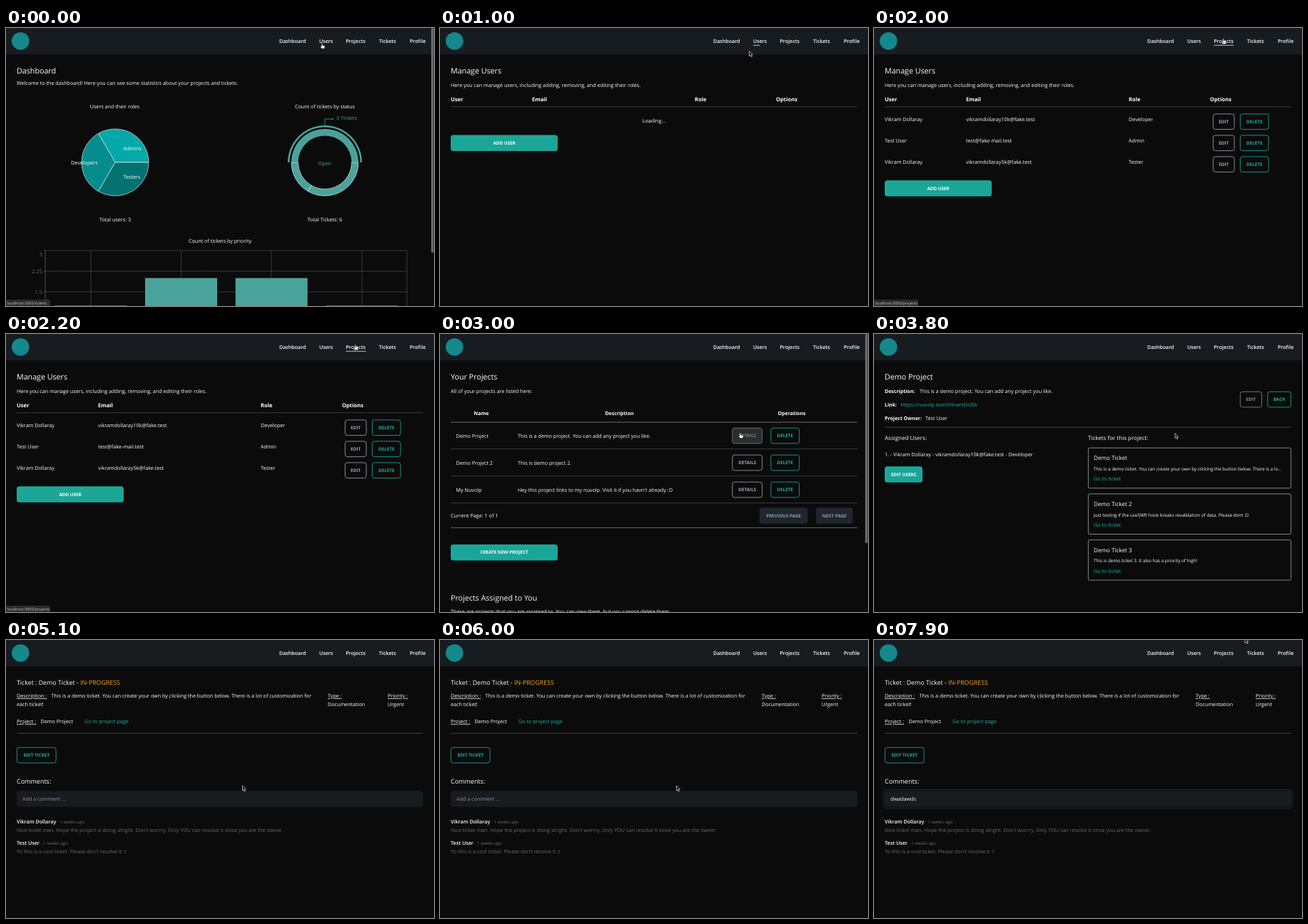
Recreate the animation shown at these times as an HTML page. Size 600 by 391 pixels, loop 8000 ms.

```html
<!DOCTYPE html>
<html lang="en">
<head>
<meta charset="utf-8">
<title>Ticket tracker tour</title>
<style>
  html, body { margin: 0; height: 100%; overflow: hidden; background: #0b0b0b; }
  svg { display: block; width: 600px; height: 391px; font: 500 7.2px "Open Sans", "Noto Sans", sans-serif; fill: #fff; text-rendering: geometricPrecision; }
  text { white-space: pre; }
  .b { font-weight: 700; }
  .m { font-weight: 600; }
  .c { text-anchor: middle; }
  .e { text-anchor: end; }
  .u { text-decoration: underline; }
  .teal { fill: #1fb2a6; }
  .grey { fill: #6c6c6c; }
  .dim { fill: #8b929a; }
</style>
</head>
<body>
<svg id="stage" viewBox="0 0 600 391"></svg>
<script>
const LOOP = 8000, TEAL = '#1fb2a6', CHART = '#4aa39a', MUTED = '#a3a9b3';
const PERSON = 'Vikram Dollaray', GUEST = 'Test User';

// Drawing helpers, each returning SVG markup
const text = (x, y, str, cls = '', size = 7.2) =>
  `<text x="${x}" y="${y}" class="${cls}" style="font-size:${size}px">${str}</text>`;
const span = (str, cls, size = 7.2) => `<tspan class="${cls}" style="font-size:${size}px">${str}</tspan>`;
const rect = (x, y, w, h, fill, r = 3) => `<rect x="${x}" y="${y}" width="${w}" height="${h}" rx="${r}" fill="${fill}"/>`;
const frameBox = (x, y, w, h, stroke, r = 3, fill = 'none') =>
  `<rect x="${x + .4}" y="${y + .4}" width="${w - .8}" height="${h - .8}" rx="${r}" fill="${fill}" stroke="${stroke}" stroke-width=".8"/>`;
const path = (d, stroke, width = .75, extra = '') =>
  `<path d="${d}" fill="none" stroke="${stroke}" stroke-width="${width}" ${extra}/>`;
const rule = (y, color = '#4a4a4a') => path(`M15 ${y}H585`, color);
const title = str => text(15, 64, str, '', 10.7);
const label = (x, y, w, h, str, color) =>
  `<text x="${x + w / 2}" y="${y + h / 2 + 2.2}" class="b c" style="font-size:6.3px;fill:${color}">${str}</text>`;
const solid = (x, y, w, str, fill = '#1ba698', color = '#fff') => rect(x, y, w, 22.5, fill, 3.5) + label(x, y, w, 22.5, str, color);
const outline = (x, y, w, str, color = TEAL, fill) => frameBox(x, y, w, 22.5, color, 3.2, fill) + label(x, y, w, 22.5, str, color);
const scrollbar = h => rect(596, 0, 3.5, h, '#6a6a6a', 1.7);

const polar = (cx, cy, r, deg) => {
  const a = deg * Math.PI / 180;
  return `${cx + r * Math.cos(a)} ${cy - r * Math.sin(a)}`;
};
const sector = (cx, cy, r0, r1, a0, a1, fill, stroke = '#fff') => {
  const p = (r, a) => polar(cx, cy, r, a);
  return `<path fill="${fill}" stroke="${stroke}" stroke-width=".6" d="M${p(r0, a0)}L${p(r1, a0)}
    A${r1} ${r1} 0 0 0 ${p(r1, a1)}L${p(r0, a1)}A${r0} ${r0} 0 0 1 ${p(r0, a0)}Z"/>`;
};

const nav = [['Dashboard', 383, 37], ['Users', 439, 19], ['Projects', 476.5, 28], ['Tickets', 523, 24], ['Profile', 566, 23]];
const header = rect(0, 0, 600, 37, '#171c21', 0) +
  '<circle cx="20.3" cy="18.3" r="12.3" fill="#14888a"/>' +
  nav.map(([name, x]) => text(x, 21, name, 'm', 7.1)).join('');

const barChart = () => {
  const yOf = v => 429 - v * 38.65;
  const grid = [3, 2.25, 1.5].map(v => `M55 ${yOf(v)}H562`).join('') +
    [119, 245.5, 372, 499, 562].map(x => `M${x} 313V391`).join('');
  return path(grid, '#8f8f8f', .7, 'stroke-dasharray="1.2 1.2"') + path('M55 313V391', '#666') +
    [1, 2, 2, 1].map((v, i) => rect(68.3 + 126.7 * i, yOf(v), 101, 80, CHART, 0)).join('') +
    [[3, 321], [2.25, 345], [1.5, 374]].map(([v, y]) => text(51, y, v, 'e grey', 7.4) + path(`M53 ${yOf(v)}H55`, '#666')).join('');
};

const dashboard = title('Dashboard') +
  text(15, 80, 'Welcome to the dashboard! Here you can see some statistics about your projects and tickets.') +
  text(152.5, 113, 'Users and their roles', 'c') + text(447, 113, 'Count of tickets by status', 'c') +
  sector(153, 189, 0, 47, 0, 120, '#05a8a8') + sector(153, 189, 0, 47, 120, 240, '#058c8c') +
  sector(153, 189, 0, 47, 240, 360, '#057272') +
  text(164.5, 171.5, 'Admins') + text(91, 192, 'Developers') + text(164.5, 212, 'Testers') +
  sector(447, 189, 37.5, 47, 180, 240, CHART) + sector(447, 189, 37.5, 47, 240, 360, CHART) +
  sector(447, 189, 37.5, 47, 0, 180, CHART, 'none') + sector(447, 189, 49.5, 52, 0, 180, CHART, 'none') +
  path('M447 138V128H458', CHART) + `<circle cx="458" cy="128" r="1" fill="${CHART}"/>` +
  '<clipPath id="labelClip"><rect x="440" y="124" width="80" height="20"/></clipPath>' +
  `<g clip-path="url(#labelClip)" style="fill:${CHART}">${text(463, 128.5, '3 Tickets')}</g>` +
  `<g style="fill:${CHART}">${text(447, 192.5, 'Open', 'c')}</g>` +
  text(153, 272, 'Total users: 3', 'c') + text(447, 272, 'Total Tickets: 6', 'c') +
  text(300, 302, 'Count of tickets by priority', 'c') + barChart() + scrollbar(316);

const usersHead = title('Manage Users') +
  text(15, 83, 'Here you can manage users, including adding, removing, and editing their roles.') +
  [['User', 15], ['Email', 129], ['Role', 357], ['Options', 471]].map(([s, x]) => text(x, 103, s, 'b', 7.6)).join('') + rule(110.7);
const usersLoading = usersHead + text(300, 132.5, 'Loading...', 'c') + solid(15, 150.5, 150, 'ADD USER');
const users = usersHead +
  [[PERSON, 'vikramdollaray10k@fake.test', 'Developer'], [GUEST, 'test@fake-mail.test', 'Admin'], [PERSON, 'vikramdollaray5k@fake.test', 'Tester']]
    .map(([name, mail, role], i) => {
      const y = 131.2 + 30 * i;
      return text(15, y, name) + text(129, y, mail) + text(357, y, role) +
        outline(475, y - 10.7, 30.5, 'EDIT', MUTED) + outline(513, y - 10.7, 40.5, 'DELETE');
    }).join('') + solid(15, 214.3, 150, 'ADD USER');

const projects = hover => title('Your Projects') + text(15, 83, 'All of your projects are listed here:') +
  [['Name', 58], ['Description', 251.5], ['Operations', 493]].map(([s, x]) => text(x, 113.5, s, 'b c', 7)).join('') +
  rule(124, '#8d8d8d') +
  [['Demo Project', 'This is a demo project. You can add any project you like.'], ['Demo Project 2', 'This is demo project 2.'],
   ['My Nuvolp', 'Hey this project links to my nuvolp. Visit it if you havn\'t already :D']]
    .map(([name, about], i) => {
      const y = 145.5 + 38 * i, lit = hover && !i;
      return text(22.5, y, name) + text(109, y, about) +
        outline(409.5, y - 13.7, 42.5, 'DETAILS', lit ? '#7b7f85' : MUTED, lit ? '#2b2c2e' : 'none') +
        outline(463.5, y - 13.7, 40.5, 'DELETE') + rule(y + 16.2);
    }).join('') +
  text(15, 258, 'Current Page: 1 of 1') + rule(272.5, '#7d7d7d') +
  solid(448, 244.3, 67.5, 'PREVIOUS PAGE', '#20262d', '#959ba3') + solid(527, 244.3, 51.5, 'NEXT PAGE', '#20262d', '#959ba3') +
  solid(15, 296, 150, 'CREATE NEW PROJECT') + text(15, 375, 'Projects Assigned to You', '', 10.7) +
  text(15, 393, 'These are projects that you are assigned to. You can view them, but you cannot delete them.') + scrollbar(294);

const project = title('Demo Project') +
  text(15, 83, 'Description:', 'b', 7) + text(64, 83, 'This is a demo project. You can add any project you like.') +
  text(15, 102, 'Link:', 'b', 7) + text(37.5, 102, 'https://nuvolp.test/VikramDol5k', 'teal') +
  text(15, 121, 'Project Owner:', 'b', 7) + text(72, 121, GUEST) +
  outline(513, 80.8, 31, 'EDIT', '#8b9096') + outline(551.5, 80.8, 33.5, 'BACK') + rule(131.3, '#555') +
  text(15, 149, 'Assigned Users:', '', 8) + text(300, 149, 'Tickets for this project:', '', 8) +
  text(15, 172, `1. - ${PERSON} - vikramdollaray10k@fake.test - Developer`) + solid(15, 186.3, 53, 'EDIT USERS') +
  [['Demo Ticket', 'This is a demo ticket. You can create your own by clicking the button below. There is a lo…'],
   ['Demo Ticket 2', 'Just testing if the useSWR hook breaks revalidation of data. Please dont :D'],
   ['Demo Ticket 3', 'This is demo ticket 3. It also has a priority of high!']]
    .map(([name, about], i) => {
      const y = 159.8 + 64.7 * i;
      return frameBox(300, y, 285, 57.4, '#a5a5a5', 2) + text(308, y + 17.5, name, '', 8.1) +
        text(308, y + 32, about, '', 6.35) + text(308, y + 46.5, 'Go to ticket', 'teal');
    }).join('');

const comment = (y, who, str) => text(15, y, span(who, 'm') + span(' - 1 weeks ago', 'grey', 6.1)) + text(15, y + 11.5, str, 'grey');
const ticket = text(15, 62.5, 'Ticket : Demo Ticket - <tspan fill="#f5a524">IN-PROGRESS</tspan>', '', 8.8) +
  text(15, 81, 'Description :', 'u') +
  text(63.5, 81, 'This is a demo ticket. You can create your own by clicking the button below. There is a lot of customization for') +
  text(15, 92.5, 'each ticket!') + text(451, 81, 'Type :', 'u') + text(451, 92.5, 'Documentation') +
  text(535, 81, 'Priority :', 'u') + text(535, 92.5, 'Urgent') +
  text(15, 117, 'Project :', 'u') + text(48.5, 117, 'Demo Project') + text(110, 117, 'Go to project page', 'teal') +
  rule(131.3, '#555') + outline(15, 150.8, 55.5, 'EDIT TICKET') + text(15, 201.5, 'Comments:', '', 9) +
  rect(15, 212.3, 570, 22.5, '#171c21') +
  comment(258, PERSON, "Nice ticket man. Hope the project is doing alright. Don't worrry, Only YOU can resolve it since you are the owner.") +
  comment(288, GUEST, "Yo this is a cool ticket. Please don't resolve it :/");

// Timeline: [start, value]
const pages = [[0, dashboard], [500, usersLoading], [1400, users], [2300, projects(false)], [2800, projects(true)], [3400, project], [5100, ticket]];
const links = [[0, 'tickets'], [100, 'users'], [500, ''], [1800, 'projects'], [2300, ''], [4600, 'tickets/1'], [5100, '']];
const underlines = [[1, 0, 950], [2, 1750, 2300]];
const pointer = [[0, 443, 22], [700, 443, 22], [1000, 433.5, 32.5], [1350, 433.5, 32.5], [1900, 490, 15.5], [2350, 490, 15.5], [2850, 421, 139.5],
  [3900, 422, 139.5], [4500, 331.5, 204.8], [6000, 331.5, 204.8], [6400, 313, 224], [7720, 313, 224], [7880, 520, -3]];
const shapes = [[0, 'hand'], [500, 'arrow'], [1800, 'hand'], [2300, 'arrow'], [2800, 'hand'], [3400, 'arrow'], [4500, 'hand'], [5100, 'arrow'],
  [6200, 'beam'], [7000, ''], [7720, 'arrow']];
const TYPED = 'dwadawds', FOCUS = 6500, TYPE_FROM = 6950, TYPE_STEP = 95;

const stage = document.getElementById('stage');
stage.innerHTML = rect(0, 0, 600, 391, '#0b0b0b', 0) + header +
  pages.map(([, markup]) => `<g class="page">${markup}</g>`).join('') +
  `<g id="field">${frameBox(13, 210.3, 574, 26.5, '#2b333a', 4)}</g>` + text(23, 226, '<tspan id="entry"></tspan>') +
  '<path id="caret" stroke="#fff" stroke-width=".6"/><path id="underline" stroke="#f4f4f4" stroke-width=".75"/>' +
  `<g id="status">${rect(-3, 382, 65, 12, '#2b2c2f', 2)}<text id="link" x="1.5" y="388.8" style="font-size:5.5px;fill:#c8c8c8"></text></g>` +
  `<g id="pointer" stroke-linejoin="round">
    <path class="arrow" d="M0 0V7L1.6 5.6 2.7 8.2 3.9 7.7 2.8 5.2H5Z" fill="#111" stroke="#ddd" stroke-width=".7"/>
    <path class="hand" d="M-.8 0Q0-1 .7 0V2.4L3.6 3.1Q4.2 3.4 4 4.6L3.3 7H-.3L-2.4 4.2Q-2.3 3.2-.8 4.2Z" fill="#fff" stroke="#222" stroke-width=".5"/>
    <path class="beam" d="M-1.2-4Q0-4 0-3V3Q0 4-1.2 4M1.2-4Q0-4 0-3M0 3Q0 4 1.2 4" fill="none" stroke="#ccc" stroke-width=".7"/></g>`;

const $ = id => document.getElementById(id);
const groups = [...stage.querySelectorAll('.page')], cursors = [...$('pointer').children];
const show = (el, on) => { el.style.display = on ? '' : 'none'; };
const indexAt = (list, t) => list.findLastIndex(([start]) => start <= t);
const clamp = v => Math.max(0, Math.min(1, v));
const ease = v => v * v * (3 - 2 * v);

function draw(t) {
  const page = indexAt(pages, t);
  groups.forEach((g, i) => show(g, i === page));

  const link = links[indexAt(links, t)][1];
  show($('status'), link);
  $('link').textContent = 'localhost:3000/' + link;

  $('underline').setAttribute('d', underlines.map(([item, from, to]) => {
    const grow = clamp((t - from) / 250) * (1 - clamp((t - to) / 100));
    return grow && `M${nav[item][1]} 24.3h${nav[item][2] * grow}`;
  }).filter(Boolean).join(''));

  const onTicket = t >= 5100, typed = TYPED.slice(0, Math.max(0, Math.ceil((t - TYPE_FROM) / TYPE_STEP)));
  $('entry').textContent = onTicket ? typed || 'Add a comment ...' : '';
  $('entry').setAttribute('class', typed ? '' : 'dim');
  show($('field'), t >= FOCUS);
  const end = 23 + (typed ? $('entry').getComputedTextLength() : 0);
  $('caret').setAttribute('d', `M${end + .5} 219.5v8`);
  show($('caret'), t >= FOCUS && t < 7850);

  const k = indexAt(pointer, t), [t0, x0, y0] = pointer[k], [t1, x1, y1] = pointer[k + 1] || [LOOP, x0, y0];
  const p = ease(clamp((t - t0) / (t1 - t0)));
  $('pointer').setAttribute('transform', `translate(${x0 + (x1 - x0) * p} ${y0 + (y1 - y0) * p})`);
  const shape = shapes[indexAt(shapes, t)][1];
  cursors.forEach(c => show(c, c.getAttribute('class') === shape));
}

function frame() {
  draw(performance.now() % LOOP);
  requestAnimationFrame(frame);
}
frame();
</script>
</body>
</html>
```
